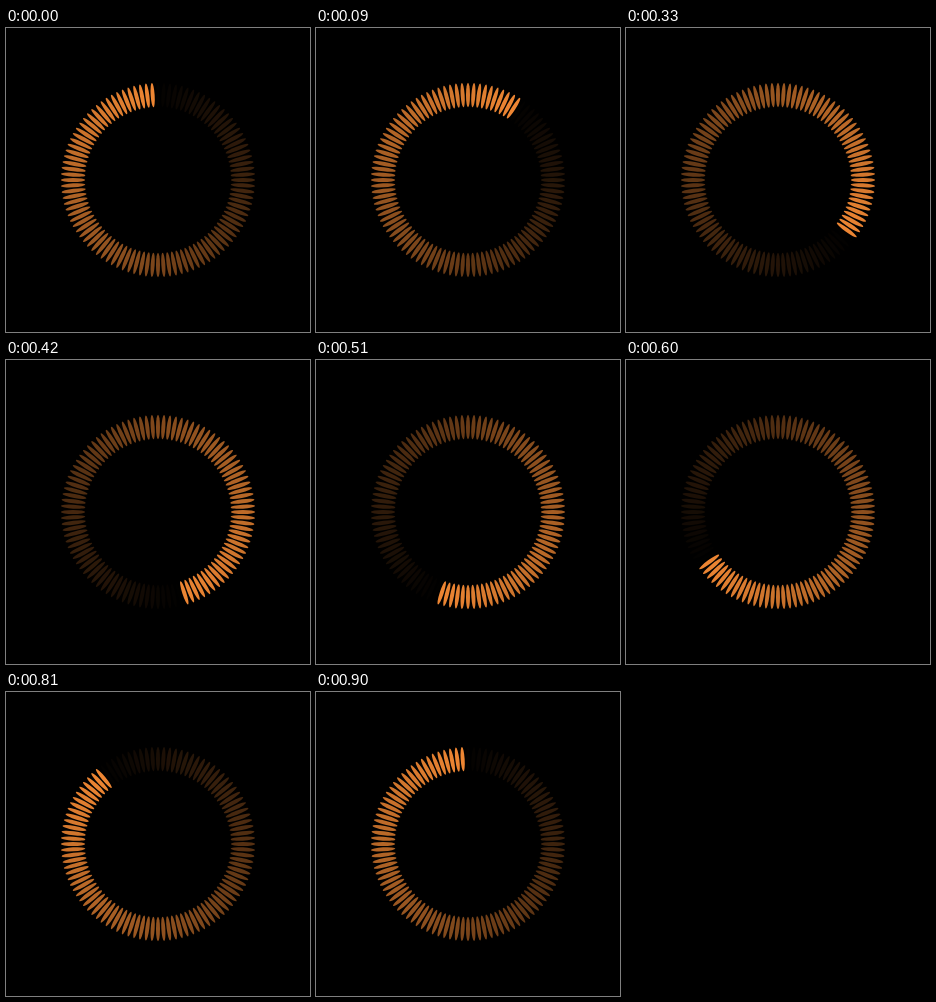
Write an HTML page that moves like this. It is 304x304 px and loops after 0.93 s.

```html
<!DOCTYPE html>
<html lang="en">
<head>
<meta charset="utf-8">
<title>Spinner</title>
<style>
  html, body { margin: 0; width: 100%; height: 100%; overflow: hidden; background: #000; }
  svg { display: block; width: 100vw; height: 100vh; }
  ellipse { fill: #ee8633; }
</style>
</head>
<body>
<svg id="ring" viewBox="0 0 304 304"></svg>
<script>
  const COUNT = 100, CENTER = 152, RADIUS = 85;
  const STEP = 30, LOOP = 930, TURN = 900;
  const ring = document.getElementById('ring');

  const blades = Array.from({ length: COUNT }, (_, i) => {
    const blade = document.createElementNS('http://www.w3.org/2000/svg', 'ellipse');
    const attrs = {
      cx: CENTER, cy: CENTER - RADIUS, rx: 2, ry: 12.2,
      transform: `rotate(${i * 360 / COUNT} ${CENTER} ${CENTER})`
    };
    for (const name in attrs) blade.setAttribute(name, attrs[name]);
    return ring.appendChild(blade);
  });

  // The head sweeps clockwise; each blade fades linearly over one turn.
  function draw(time) {
    const step = Math.floor((time % LOOP) / STEP);
    const head = step * STEP * COUNT / TURN - 1;
    blades.forEach((blade, i) => {
      const age = (head - i + 2 * COUNT + 1e-6) % COUNT;
      blade.style.opacity = 1 - age / COUNT;
    });
  }

  const start = performance.now();
  function tick() {
    draw(performance.now() - start);
    requestAnimationFrame(tick);
  }
  tick();
</script>
</body>
</html>
```
